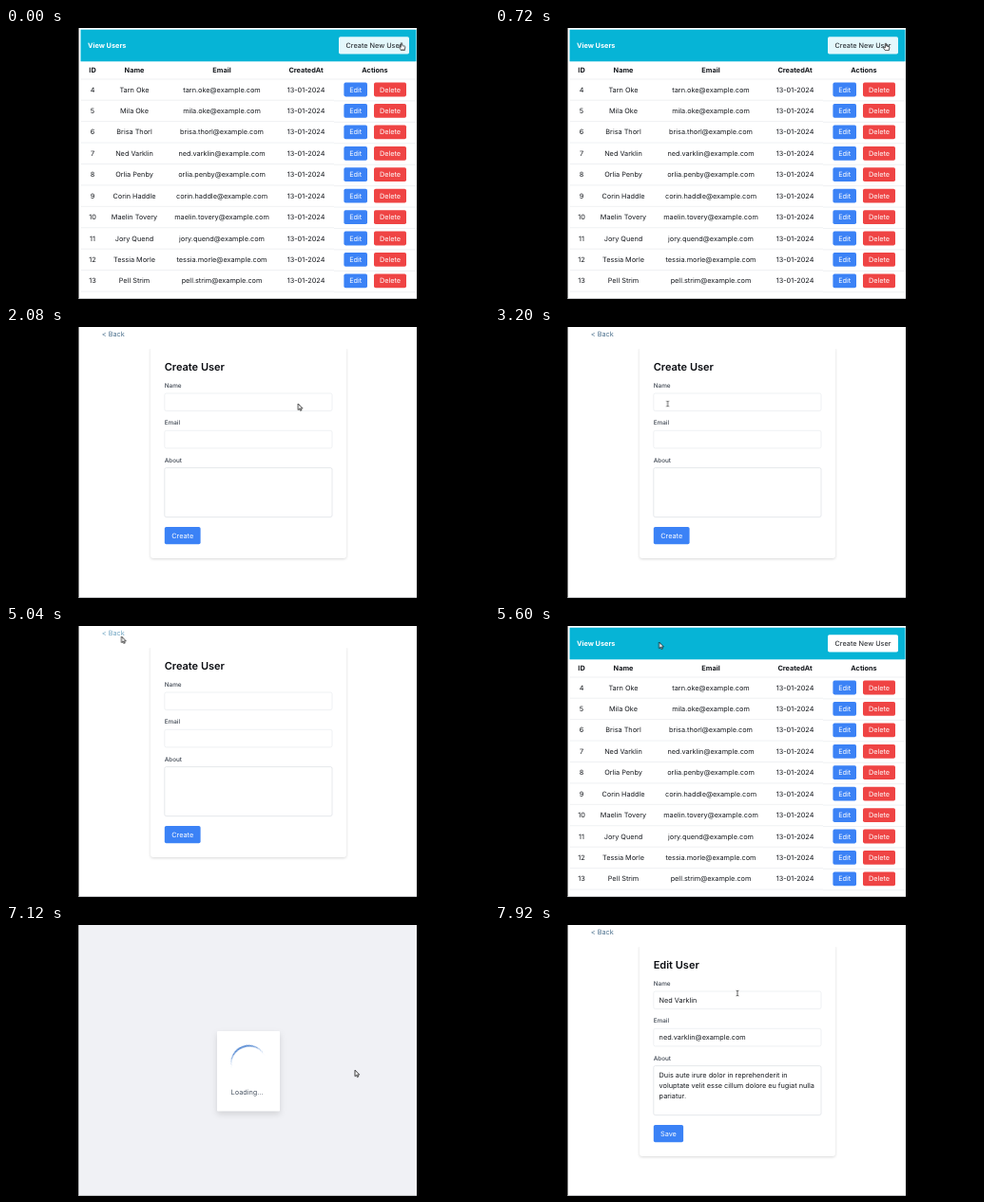
Write an HTML page that moves like this. It is 508 px wide and 286 px high and loops after 8 s.

```html
<!DOCTYPE html>
<html lang="en">
<head>
<meta charset="utf-8">
<title>View Users</title>
<style>
html, body { margin: 0; width: 100%; height: 100%; overflow: hidden; background: #000; }
svg { display: block; width: 100%; height: 100%; }
text { font: 400 7.3px Inter, sans-serif; fill: #15181d; text-rendering: geometricPrecision; }
.mid { text-anchor: middle; }
.bold { font-weight: 700; }
.light { fill: #fff; }
.title { font-size: 11px; font-weight: 600; fill: #0b0d12; }
.label { font-size: 6.4px; font-weight: 500; fill: #3f4752; }
.rule { stroke: #e5e7eb; stroke-width: .6; }
.field { fill: #fff; stroke: #dfe2e7; stroke-width: .5; }
.blue { fill: #3b82f6; }
.red { fill: #ef4444; }
.card { fill: #fff; filter: drop-shadow(0 1.6px 1.6px rgba(0, 0, 0, .15)); }
.loadcard { fill: #fff; filter: drop-shadow(0 3px 3px rgba(0, 0, 0, .13)); }

/* 1% of the loop is 80 ms */
.table, .load, .form, .new, .edit, .arrow, .hand, .beam, .hover, .back { animation: 8s step-end infinite; }
.table { animation-name: table; }
.load { animation-name: load; }
.form { animation-name: form; }
.new { animation-name: new; }
.edit { animation-name: edit; }
.arrow { animation-name: arrow; }
.hand { animation-name: hand; }
.beam { animation-name: beam; }
.hover { animation-name: hover; }
.back { fill: #4a6f8c; animation: back 8s linear infinite; }
.spin { animation: spin 1s -.82s linear infinite; }
.cursor { animation: move 8s linear infinite; }

@keyframes table { 0%, 65% { visibility: visible } 14%, 85%, 100% { visibility: hidden } }
@keyframes load { 0%, 22%, 91%, 100% { visibility: hidden } 14%, 85% { visibility: visible } }
@keyframes form { 0%, 65% { visibility: hidden } 22%, 91%, 100% { visibility: visible } }
@keyframes new { 0%, 65%, 100% { visibility: hidden } 22% { visibility: visible } }
@keyframes edit { 0% { visibility: hidden } 91%, 100% { visibility: visible } }
@keyframes hover { 0% { fill: #e4f8fc } 14%, 100% { fill: #fff } }
@keyframes back { 0%, 57.5% { fill: #4a6f8c } 59%, 65% { fill: #70a5c2 } 66%, 100% { fill: #4a6f8c } }
@keyframes spin { to { transform: rotate(360deg) } }
@keyframes arrow {
  0%, 27%, 37%, 47.5%, 82%, 95%, 100% { visibility: hidden }
  14%, 35.5%, 42%, 55.5%, 85% { visibility: visible }
}
@keyframes hand {
  0%, 51%, 82% { visibility: visible }
  14%, 53%, 85%, 100% { visibility: hidden }
}
@keyframes beam {
  0%, 35.5%, 42%, 51%, 55.5% { visibility: hidden }
  27%, 37%, 47.5%, 53%, 95%, 100% { visibility: visible }
}
@keyframes move {
  0%, 1% { transform: translate(416px, 15.5px) }
  9%, 13% { transform: translate(411px, 16px) }
  15% { transform: translate(406px, 17px) }
  19% { transform: translate(392px, 24px) }
  23%, 25% { transform: translate(316px, 62px) }
  28% { transform: translate(290px, 118px) }
  31% { transform: translate(240px, 168px) }
  33% { transform: translate(215px, 150px) }
  35% { transform: translate(198px, 108px) }
  37% { transform: translate(184px, 86px) }
  40% { transform: translate(181.5px, 81px) }
  43% { transform: translate(205px, 92px) }
  46%, 47% { transform: translate(195px, 96px) }
  50% { transform: translate(190px, 165px) }
  52% { transform: translate(188px, 214px) }
  54% { transform: translate(186px, 165px) }
  57% { transform: translate(178px, 57px) }
  58%, 64% { transform: translate(121.5px, 11px) }
  66% { transform: translate(130px, 9px) }
  70% { transform: translate(172.5px, 17px) }
  72% { transform: translate(190px, 24px) }
  76% { transform: translate(318px, 98px) }
  78.5% { transform: translate(382px, 146px) }
  81% { transform: translate(362px, 146px) }
  83%, 86% { transform: translate(366px, 131px) }
  92%, 93% { transform: translate(368px, 175px) }
  96% { transform: translate(312px, 118px) }
  99%, 100% { transform: translate(255px, 72px) }
}
</style>
</head>
<body>
<svg viewBox="0 0 508 286">
  <rect width="508" height="286"/>
  <rect x="76.5" width="355.5" height="286" fill="#fff"/>

  <g class="table">
    <rect x="78.5" y="1.7" width="353" height="33.6" fill="#06b4d6"/>
    <text class="bold light" x="86" y="21">View Users</text>
    <rect class="hover" x="350" y="9.2" width="74" height="18.4" rx="1.8"/>
    <text class="mid" x="387" y="21.1">Create New User</text>
    <g id="rows"></g>
  </g>

  <g class="load">
    <rect x="76.5" width="355.5" height="286" fill="#f0f1f5"/>
    <rect class="loadcard" x="222" y="112" width="66" height="84.6" rx="1"/>
    <g transform="translate(255 145)">
      <path class="spin" fill="#4a82d0" d="M-18.3 0A18.3 18.3 0 0 1 18.3 0A18.3 16.5 0 0 0-18.3 0Z"/>
    </g>
    <text class="mid" x="253.6" y="179" style="fill:#4b5563">Loading...</text>
  </g>

  <g class="form">
    <text class="back" x="100.8" y="10.1">&lt; Back</text>
    <rect class="card" x="152" y="21" width="206" height="223" rx="3"/>
    <rect x="150" y="18" width="210" height="5" fill="#fff"/>
    <text class="label" x="166.7" y="64">Name</text>
    <rect class="field" x="166.8" y="70" width="176.2" height="18.6" rx="1.8"/>
    <text class="label" x="166.7" y="103.3">Email</text>
    <rect class="field" x="166.8" y="109.3" width="176.2" height="18.6" rx="1.8"/>
    <text class="label" x="166.7" y="142.6">About</text>
    <rect class="field" x="166.8" y="148.6" width="176.2" height="52" rx="1.8" style="stroke:#cdd1d8"/>
  </g>

  <g class="new">
    <text class="title" x="166.7" y="46.4">Create User</text>
    <rect class="blue" x="166.8" y="211" width="37.8" height="18.3" rx="1.8"/>
    <text class="mid light" x="185.7" y="222.8">Create</text>
  </g>

  <g class="edit">
    <text class="title" x="166.7" y="46.4">Edit User</text>
    <text x="172.6" y="82">Ned Varklin</text>
    <text x="172.6" y="121.3">ned.varklin@example.com</text>
    <text x="172.6" y="160.6">Duis aute irure dolor in reprehenderit in</text>
    <text x="172.6" y="171.6">voluptate velit esse cillum dolore eu fugiat nulla</text>
    <text x="172.6" y="182.6">pariatur.</text>
    <rect class="blue" x="166.8" y="211" width="31.3" height="18.3" rx="1.8"/>
    <text class="mid light" x="182.4" y="222.8">Save</text>
  </g>

  <rect x="76.5" y="285" width="355.5" height="1" fill="#c2c4c6"/>

  <g class="cursor" stroke-linejoin="round">
    <path class="arrow" fill="#fff" stroke="#111" stroke-width=".8" d="M0 0V6.6L1.5 5.3L2.5 7.5L3.6 7L2.6 4.9H4.7Z"/>
    <path class="hand" fill="#fff" stroke="#111" stroke-width=".7" d="M-.7 .5Q0-.5 .7 .5V3L3.4 3.7Q4 4 3.9 4.7L3.3 7.6H-.6L-2.6 4.9Q-2.5 3.9-1.5 4.4L-.7 5Z"/>
    <path class="beam" fill="none" stroke="#222" stroke-width=".7" d="M-1.4-2.8Q0-2.8 0-2Q0-2.8 1.4-2.8M0-2V2M-1.4 2.8Q0 2.8 0 2Q0 2.8 1.4 2.8"/>
  </g>
</svg>
<script>
const users = ["Tarn Oke", "Mila Oke", "Brisa Thorl", "Ned Varklin", "Orlia Penby",
  "Corin Haddle", "Maelin Tovery", "Jory Quend", "Tessia Morle", "Pell Strim"];
const columns = [91, 135, 227, 315.6];
const pitch = 22.43;

const text = (x, y, value, cls = "") => `<text class="mid ${cls}" x="${x}" y="${y}">${value}</text>`;
const rule = (x1, x2, y) => `<path class="rule" d="M${x1} ${y}H${x2}"/>`;
const button = (x, y, width, color, label) =>
  `<rect class="${color}" x="${x}" y="${y - 7.4}" width="${width}" height="14.8" rx="1.8"/>` +
  text(x + width / 2, y + 2.6, label, "light");

let html = ["ID", "Name", "Email", "CreatedAt", "Actions"]
  .map((name, i) => text([...columns, 388][i], 47.2, name, "bold")).join("");
html += rule(78.5, 431.5, 54);

users.forEach((name, i) => {
  const y = 65 + i * pitch;
  const email = name.toLowerCase().replace(" ", ".") + "@example.com";
  html += [i + 4, name, email, "13-01-2024"].map((v, c) => text(columns[c], y + 2.6, v)).join("");
  html += button(355.4, y, 24.6, "blue", "Edit") + button(387, y, 34, "red", "Delete");
  html += rule(78.5, 345, y + 11.2) + rule(345, 431.5, y + 11.9);
});
document.getElementById("rows").innerHTML = html;
</script>
</body>
</html>
```
